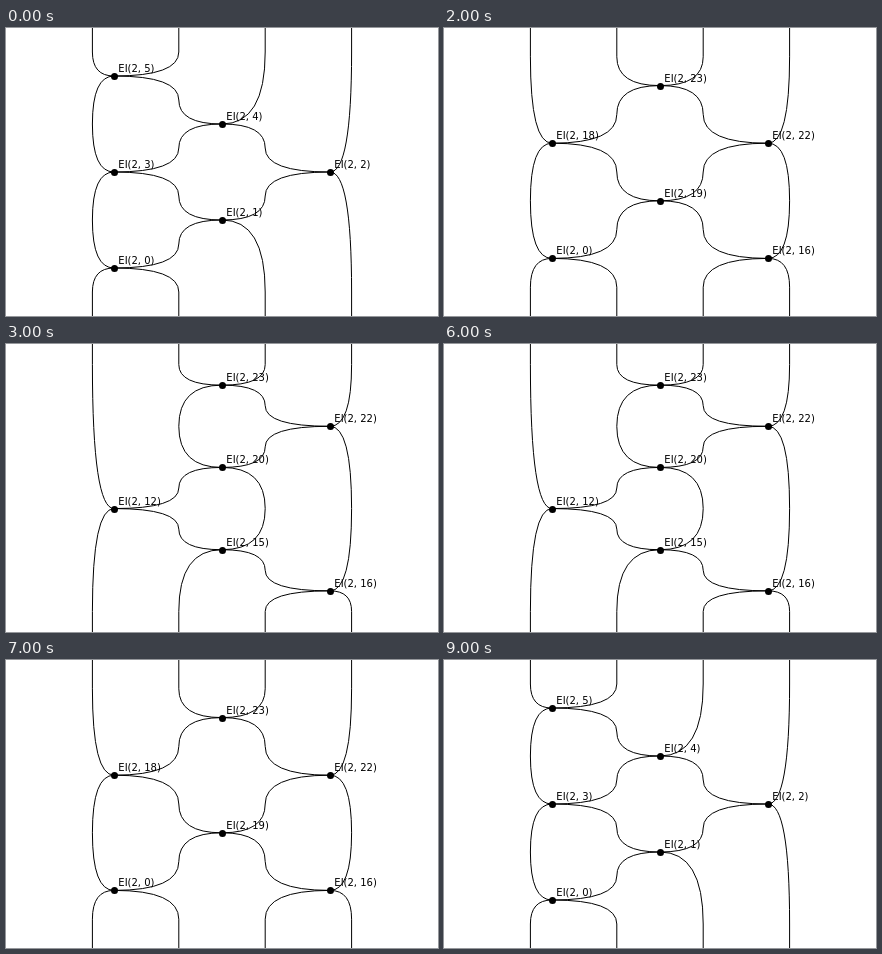
Recreate the animation shown at these times as an HTML page with a canvas. Size 432 px wide and 288 px high, loop 10 s.

```html
<!DOCTYPE html>
<html>
<head>
<meta charset="utf-8">
<style>
html, body { margin: 0; width: 432px; height: 288px; overflow: hidden; background: #fff; }
canvas { display: block; }
</style>
</head>
<body>
<canvas id="stage" width="432" height="288"></canvas>
<script>
const W = 432, H = 288, WIRES = 4, STEP = 1000;
const ctx = document.getElementById('stage').getContext('2d');

// Crossings from top to bottom that reverse the wires: 1, 2 1, 3 2 1
function firstDiagram() {
  const list = [];
  let id = WIRES * (WIRES - 1) / 2;
  for (let top = 1; top < WIRES; top++)
    for (let gap = top; gap > 0; gap--) list.push({ gap, id: --id });
  return list;
}

// Braid move: the triangle a b a that begins at index i becomes b a b.
function flip(list, i, ids) {
  const a = list[i].gap;
  const j = list.findIndex((c, n) => n > i && Math.abs(c.gap - a) === 1);
  const k = list.findIndex((c, n) => n > j && c.gap === a);
  const b = list[j].gap;
  const triangle = [b, a, b].map((gap, n) => ({ gap, id: ids[n] }));
  return [...list.slice(0, i), ...list.slice(i + 1, j), ...triangle,
          ...list.slice(j + 1, k), ...list.slice(k + 1)];
}

// Put every crossing on the first row below the neighbours it depends on.
function layout(list) {
  const depth = Array(WIRES + 1).fill(0);
  const nodes = list.map(({ gap, id }) => {
    const row = Math.max(depth[gap], depth[gap + 1]) + 1;
    depth[gap] = depth[gap + 1] = row;
    return { gap, id, row, x: gap * W / WIRES };
  });
  const rowHeight = H / (Math.max(...depth) + 1);
  for (const n of nodes) n.y = n.row * rowHeight;
  return { nodes, rowHeight };
}

function drawWire(k, { nodes, rowHeight }) {
  const x = k * W / (WIRES + 1);
  const stops = nodes.filter(n => n.gap === k || n.gap === k - 1);
  ctx.beginPath();
  ctx.moveTo(x, 0);
  ctx.lineTo(x, rowHeight / 2);
  stops.forEach((n, i) => {
    const next = stops[i + 1];
    const bend = next ? (n.y + next.y) / 2 : H - rowHeight / 2;
    ctx.quadraticCurveTo(x, n.y, n.x, n.y);
    ctx.quadraticCurveTo(x, n.y, x, bend);
  });
  ctx.lineTo(x, H);
  ctx.stroke();
}

function draw(diagram) {
  ctx.clearRect(0, 0, W, H);
  ctx.lineJoin = 'round';
  ctx.font = '10px "DejaVu Sans", sans-serif';
  for (let k = 1; k <= WIRES; k++) drawWire(k, diagram);
  for (const { x, y, id } of diagram.nodes) {
    const row = Math.round(y);
    ctx.beginPath();
    ctx.arc(x + 0.5, row + 0.5, 3.5, 0, 2 * Math.PI);
    ctx.fill();
    ctx.fillText(`EI(2, ${id})`, x + W / 100, row - 4);
  }
}

const moves = [
  [0, [23, 18, 21]],
  [2, [22, 19, 16]],
  [1, [20, 12, 15]],
  [0, [11, 14, 17]]
];
const diagrams = [firstDiagram()];
for (const [i, ids] of moves) diagrams.push(flip(diagrams.at(-1), i, ids));
const layouts = diagrams.map(layout);

// Play the moves forwards, then backwards.
const steps = 2 * layouts.length;
const start = performance.now();
function tick() {
  const step = Math.floor((performance.now() - start) / STEP) % steps;
  draw(layouts[Math.min(step, steps - 1 - step)]);
  requestAnimationFrame(tick);
}
tick();
</script>
</body>
</html>
```
